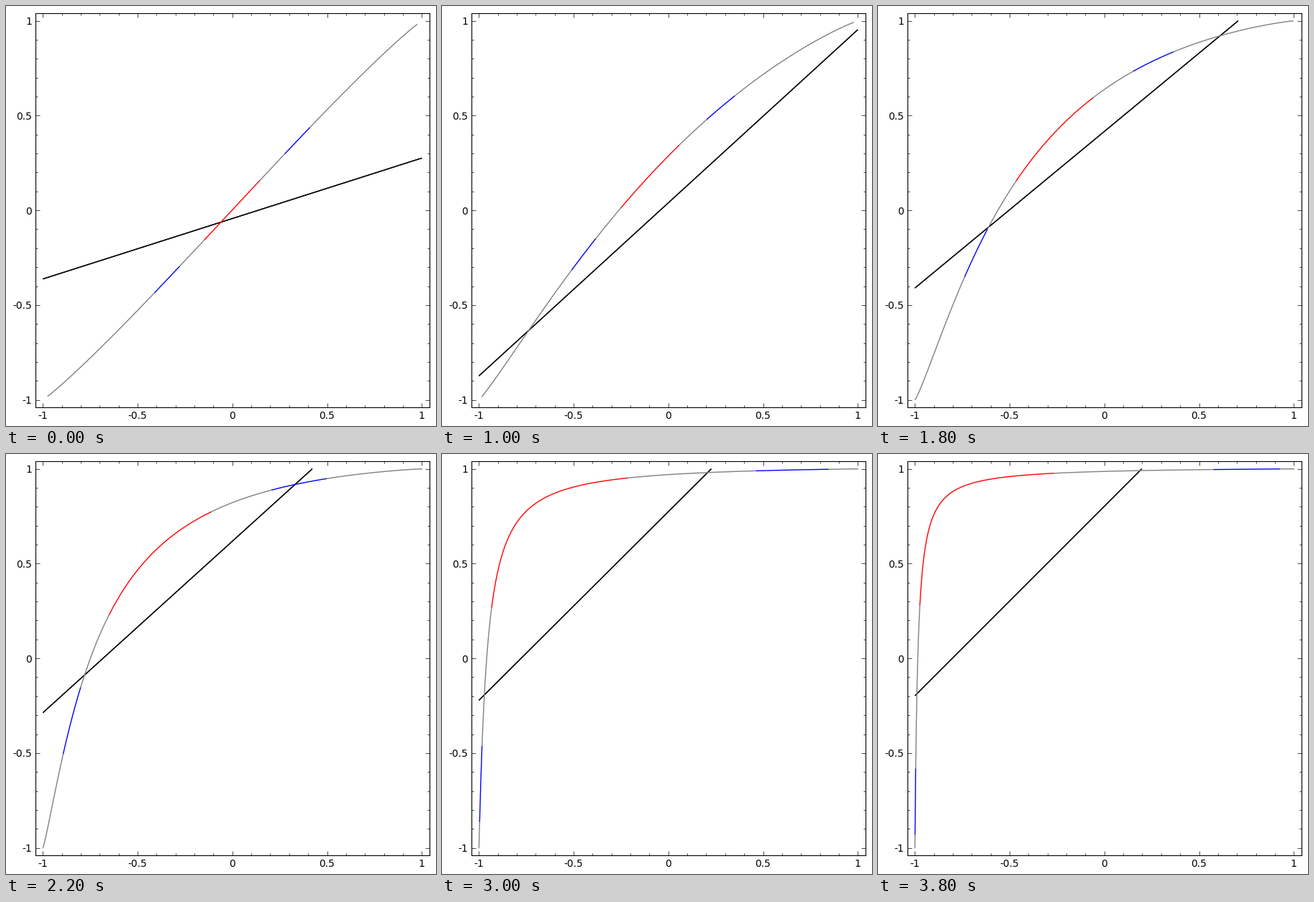
Write a matplotlib script that moves like this. It is 598 px wide and 584 px high and loops after 4000 ms.

```python
import numpy as np
import matplotlib.pyplot as plt
from matplotlib.animation import FuncAnimation

W, H, DPI = 598, 584, 100
FRAMES, STEP_MS = 20, 200
LEFT, TOP, SIDE = 40.8, 10.15, 548
LIM = 1.04
SPAN = 5  # inputs run from -SPAN to SPAN


def sigmoid(f, mid, rate):
    return 1 / (1 + np.exp(-rate * (f - mid)))


def ease(f, end, power):
    """Ease in and out from 0 to 1 over frames 0..end; power 1 is linear."""
    u = min(f / end, 1)
    return u ** power / (u ** power + (1 - u) ** power)


def bump(f, mid, width):
    return np.exp(-((f - mid) / width) ** 2 / 2)


def units(f):
    """Gain and bias of the two tanh units: a slow drift, then fast growth."""
    grow_x = sigmoid(f, 13.42, .52)
    grow_y = sigmoid(f, 12.85, .5)
    return ((.43 + 2.52 * grow_x, -.213 * ease(f, 11.5, 1.5) - 1.06 * grow_x),
            (.46 + 2.54 * grow_y, .385 * ease(f, 11.4, 1) + .91 * grow_y))


def border(f):
    """Slope and offset of the separating line."""
    slope = 1 - .68 * (1 - ease(f, 5, 1.6)) - .185 * bump(f, 8.1, 2.51)
    offset = -.048 + .8 * sigmoid(f, 8.5, .6) + .055 * sigmoid(f, 13.42, .52)
    return slope, offset


fig = plt.figure(figsize=(W / DPI, H / DPI), dpi=DPI, facecolor="white")
ax = fig.add_axes([LEFT / W, 1 - (TOP + SIDE) / H, SIDE / W, SIDE / H])
ax.set(xlim=(-LIM, LIM), ylim=(-LIM, LIM))

major = np.linspace(-1, 1, 5)
minor = [k / 10 for k in range(-10, 11) if k % 5]
for axis in (ax.xaxis, ax.yaxis):
    axis.set_ticks(major, [f"{v:g}" for v in major],
                   fontsize=10, fontfamily="DejaVu Sans")
    axis.set_ticks(minor, minor=True)
ax.tick_params(which="both", direction="in", top=True, right=True, width=.5)
ax.tick_params(which="major", length=4, pad=3.5)
ax.tick_params(which="minor", length=2)
for spine in ax.spines.values():
    spine.set_linewidth(.8)

# The border is stroked twice, which makes it look crisper.
borders = [ax.plot([], [], color="black", lw=1, solid_capstyle="butt")[0]
           for _ in range(2)]

# Input pieces: a red core, a blue band on each side, gray in between.
cuts = [-SPAN, *(np.arange(-3, 4, 2) / 3)[:0], -1, -2 / 3, -1 / 3,
        1 / 3, 2 / 3, 1, SPAN]
colors = ["gray", "blue", "gray", "red", "gray", "blue", "gray"]
pieces = [np.linspace(a, b, 200) for a, b in zip(cuts, cuts[1:])]
arcs = [ax.plot([], [], color=c, lw=1, solid_capstyle="projecting",
                zorder=2 if c == "gray" else 2.1)[0] for c in colors]


def draw(f):
    (gain_x, bias_x), (gain_y, bias_y) = units(f)
    slope, offset = border(f)
    x = np.array([-1, min(1, (1 - offset) / slope)])
    for line in borders:
        line.set_data(x, slope * x + offset)
    for line, t in zip(arcs, pieces):
        line.set_data(np.tanh(gain_x * t + bias_x), np.tanh(gain_y * t + bias_y))
    return borders + arcs


anim = FuncAnimation(fig, draw, frames=FRAMES, interval=STEP_MS,
                     repeat=True, repeat_delay=0, blit=False)
plt.show()
```
